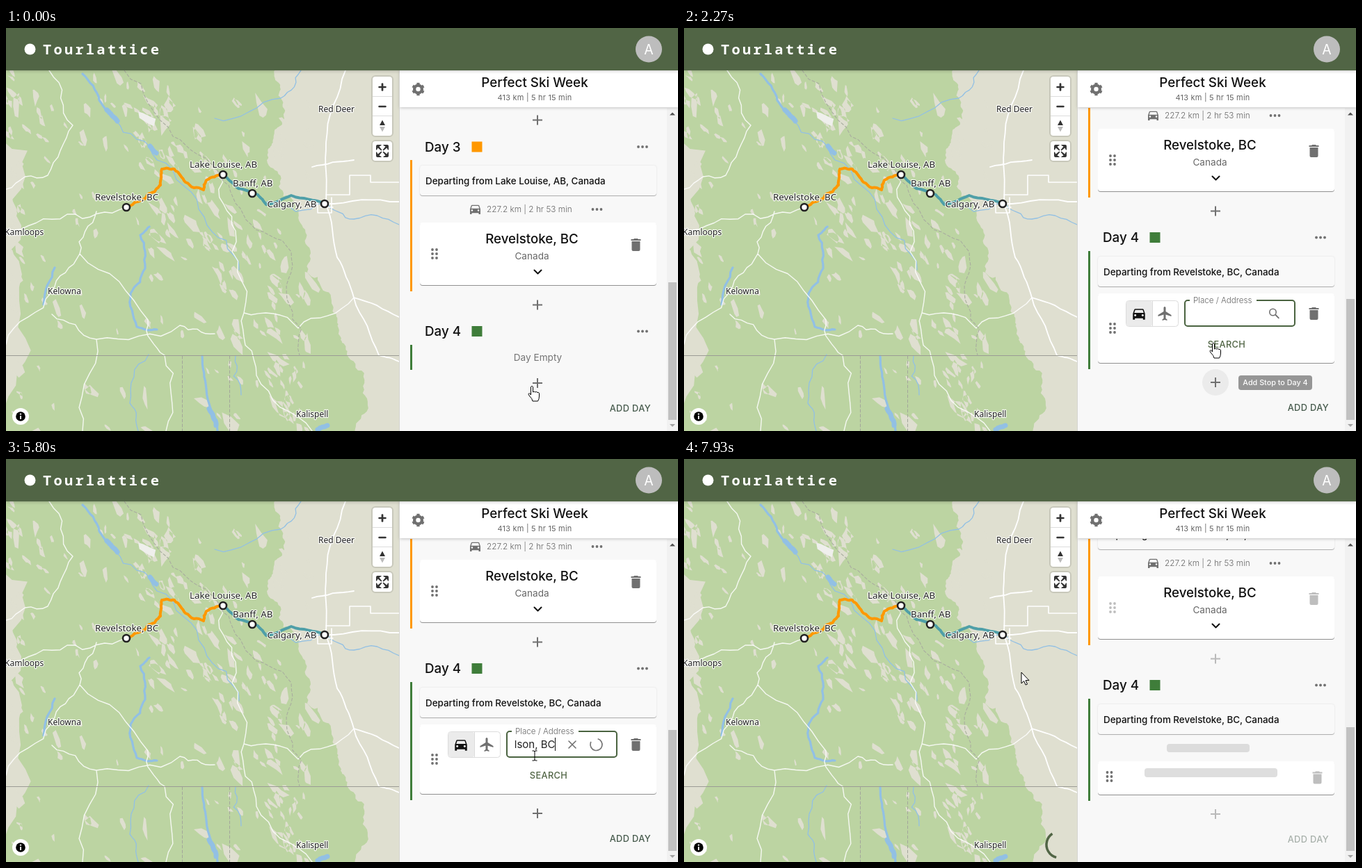
These frames come from a looping animation (966x580 px, 8000 ms). An HTML page:

```html
<!DOCTYPE html>
<html lang="en">
<head>
<meta charset="utf-8">
<title>Trip planner</title>
<style>
html,body{margin:0;width:100%;height:100%;overflow:hidden;background:#f8f8f8}
svg{display:block}
text{font-family:Inter,"Liberation Sans",sans-serif;white-space:pre}
.map text{font-family:"Noto Sans","Open Sans",sans-serif;fill:#222;paint-order:stroke;stroke:#fff;stroke-width:2.4px;stroke-linejoin:round;stroke-opacity:.85}
.brand{font-family:"Noto Sans Mono","DejaVu Sans Mono",monospace;font-weight:700;letter-spacing:3.23px}
.line{fill:none;stroke-linejoin:round;stroke-linecap:round}
.card{fill:#fff;filter:drop-shadow(0 1.3px .7px rgba(0,0,0,.42))}
.flat{fill:#f9f9f9;filter:drop-shadow(0 1px .6px rgba(0,0,0,.26)) drop-shadow(0 0 .8px rgba(0,0,0,.1))}
.ctrl{fill:#fff;stroke:rgba(0,0,0,.1);stroke-width:4;paint-order:stroke}
.bar{filter:drop-shadow(0 1px 2px rgba(0,0,0,.22))}
.soft{opacity:var(--soft,1)}
</style>
</head>
<body>
<script>
const LOOP = 8000;
const GREEN = '#516545', LEAF = '#3f7d3a', PINE = '#40603a', GREY = '#707070', INK = '#111';

// ---------- drawing helpers ----------
const text = (x, y, str, size, fill = INK, extra = '') =>
  `<text x="${x}" y="${y + size * .36}" font-size="${size}" fill="${fill}" ${extra}>${str}</text>`;
const mid = 'text-anchor="middle"', thin = 'font-weight="300"', firm = 'font-weight="500"';
const rect = (x, y, w, h, fill, extra = '') =>
  `<rect x="${x}" y="${y}" width="${w}" height="${h}" fill="${fill}" ${extra}/>`;
const box = (cls, x, y, w, h, extra = '') => rect(x, y, w, h, '', `class="${cls}" rx="4" ${extra}`);
const dot = (x, y, r, fill, extra = '') => `<circle cx="${x}" cy="${y}" r="${r}" fill="${fill}" ${extra}/>`;
const shape = (d, fill) => `<path d="${d}" fill="${fill}" fill-rule="evenodd"/>`;
const stroke = (d, color, width, extra = '') => `<path class="line" d="${d}" stroke="${color}" stroke-width="${width}" ${extra}/>`;
const ring = (id, r, color, width) => `<circle id="${id}" r="${r}" pathLength="127" fill="none" stroke="${color}" stroke-width="${width}"/>`;
const group = (id, body, extra = '') => `<g id="${id}" ${extra}>${body}</g>`;
const soft = body => `<g class="soft">${body}</g>`;
const place = (x, y, body, scale = 1) => `<g transform="translate(${x} ${y}) scale(${scale})">${body}</g>`;

// Icons are drawn around their own centre.
const add = (x, y) => rect(x - 7, y - 1, 14, 2, GREY) + rect(x - 1, y - 7, 2, 14, GREY);
const bin = (x, y) => place(x, y, shape('M-6-5H6V7Q6 9 4 9H-4Q-6 9-6 7ZM-7-6V-8H-3.500L-2.500-9H2.500L3.500-8H7V-6Z', GREY));
const car = (x, y, scale, fill = GREY) => place(x, y, shape('M-9 0L-7-6Q-6.500-7-5.500-7H5.500Q6.500-7 7-6L9 0V9H6V7H-6V9H-9ZM-7-1H7L5.500-5.500H-5.500Z', fill) +
  dot(-5.5, 2.5, 1.5, '#fff') + dot(5.5, 2.5, 1.5, '#fff'), scale);
const plane = (x, y) => place(x, y, shape('M9 4V2L1-3V-8.500Q.8-10-.5-10T-2-8.500V-3L-10 2V4L-2 1.500V7L-4 8.500V10L-.5 9L3 10V8.500L1 7V1.500Z', GREY));
const find = (x, y) => place(x, y, dot(-2, -2, 4.7, 'none', `stroke="${GREY}" stroke-width="1.600"`) + stroke('M2 2L6.300 6.300', GREY, 1.9));
const cross = (x, y) => stroke(`M${x - 5} ${y - 5}l10 10m0-10l-10 10`, GREY, 1.6);
const chevron = (x, y) => stroke(`M${x - 5} ${y - 2.5}l5 5l5-5`, INK, 2);
const gear = (x, y) => place(x, y, dot(0, 0, 5.4, 'none', `stroke="${GREY}" stroke-width="4.400"`) +
  dot(0, 0, 7.8, 'none', `stroke="${GREY}" stroke-width="2.800" pathLength="12" stroke-dasharray="1" transform="rotate(15)"`));
const more = (x, y) => [-6, 0, 6].map(d => dot(x + d, y, 1.9, GREY)).join('');
const grip = (x, y) => [-6, 0, 6].map(d => dot(x - 3, y + d, 1.9, GREY) + dot(x + 3, y + d, 1.9, GREY)).join('');
const addPin = y => place(905, y, shape('M0 9.500Q-6.700 2-6.700-3A6.700 6.700 0 0 1 6.700-3Q6.700 2 0 9.500Z', PINE) + dot(0, -3, 2.4, '#fff') +
  stroke('M7-11v8m-4-4h8', '#fff', 4) + stroke('M7-10v6m-3-3h6', PINE, 1.8));
const plus = y => soft(add(764, y));

// ---------- map ----------
let seed = 11;
const rnd = () => {
  seed = (seed + 0x6D2B79F5) | 0;
  let n = Math.imul(seed ^ seed >>> 15, 1 | seed);
  n = n + Math.imul(n ^ n >>> 7, 61 | n) ^ n;
  return ((n ^ n >>> 14) >>> 0) / 4294967296;
};
// Roughens a line given by a few key points: each pass pushes every midpoint sideways.
const wander = (str, rough = .16, passes = 3) => {
  let pts = str.split(' ').map(s => s.split(',').map(Number));
  while (passes--) pts = pts.flatMap((a, i) => {
    const b = pts[i + 1];
    if (!b) return [a];
    const k = (rnd() - .5) * 2 * rough;
    return [a, [(a[0] + b[0]) / 2 + (a[1] - b[1]) * k, (a[1] + b[1]) / 2 + (b[0] - a[0]) * k]];
  });
  return 'M' + pts.map(p => p.map(v => v.toFixed(1))).join('L');
};
const trails = (list, color, width, rough, extra) => stroke(list.map(s => wander(s, rough)).join(''), color, width, extra);

// An irregular angular patch, stretched along the mountain ranges.
const patch = (x, y, size, lean) => {
  let d = '';
  for (let i = 0; i < 7; i++) {
    const a = (i + rnd() * .8) / 7 * 6.283, r = size * (.45 + rnd() * .75);
    const u = Math.cos(a) * r * 1.5, v = Math.sin(a) * r * .55;
    d += (i ? 'L' : 'M') + (x + u * Math.cos(lean) - v * Math.sin(lean)).toFixed(1) + ' ' + (y + u * Math.sin(lean) + v * Math.cos(lean)).toFixed(1);
  }
  return d + 'Z';
};
// How open the land is: most along the ranges and near the west edge.
const openness = (x, y) => {
  const off = (x - 200 - (y - 100) * .62) / 62;
  return .13 + .62 * Math.exp(-off * off) * (y < 380 ? 1 : .55) + .5 * Math.exp(-x / 30) + .3 * (y > 500 && x > 300);
};
const clearings = () => {
  let d = '';
  for (let i = 0; i < 900; i++) {
    const x = rnd() * 440, y = 61 + rnd() * 519, p = openness(x, y);
    if (rnd() < p) d += patch(x, y, 3 + rnd() * rnd() * 12 + p * 3, 1.1 + (rnd() - .5));
  }
  return d;
};

const LAND = '#dfdfd0', WOOD = '#bcd4a2', WATER = '#92c0e4';
const stops = [['Revelstoke, BC', 128, 243, 173, 258], ['Lake Louise, AB', 264, 196, 312, 211], ['Banff, AB', 326, 223, 354, 238], ['Calgary, AB', 375.5, 253.5, 458, 253]];
const cities = [['Red Deer', 449, 117], ['Kamloops', -2, 294], ['Kelowna', 60, 379], ['Kalispell', 417, 555.5]];

const sign = (x, y) => stroke(`M${x - 4.4} ${y}h8.800`, '#333', 2.7);
const controls = box('ctrl', 527, 70, 28, 85) + box('ctrl', 527, 163, 28, 28) +
  rect(527, 98, 28, 1, '#ddd') + rect(527, 126, 28, 1, '#ddd') +
  sign(541, 85) + stroke('M541 80.600v8.800', '#333', 2.7) + sign(541, 113) +
  shape('M541 132.500l4 7.500h-8Z', '#333') + shape('M541 149.500l4-7.500h-8Z', '#bbb') +
  [0, 90, 180, 270].map(a => `<g transform="translate(541 177) rotate(${a})">${shape('M9 1.500V7Q9 9 7 9H1.500V8L4.500 6.500L.6 1.600L1.600.6L6.500 4.500L8 1.500Z', '#333')}</g>`).join('') +
  dot(21, 559, 12, '#fff') + dot(21, 559, 6.8, '#000') + rect(20, 558, 2, 5, '#fff') + dot(21, 555.6, 1.2, '#fff');

const map = `<svg class="map" x="0" y="61" width="565" height="519" viewBox="0 61 565 519">` +
  rect(0, 61, 565, 519, LAND) +
  shape(wander('-20,40 390,40 400,130 375,190 430,290 470,400 490,470 500,600 -20,600 -20,40', .22, 5) + 'Z', WOOD) +
  shape(clearings(), LAND) + shape(patch(200, 128, 14, .6), '#efefec') +
  trails(['157,132 217,190 285,272 335,348', '300,130 395,101 424,61', '375,250 458,252 500,275 565,283', '205,470 178,540 190,580', '330,472 338,528'], WATER, 1.3) +
  trails(['110,66 134,104 157,132', '206,286 193,298 200,346 179,382 188,430 217,434', '282,472 288,520 304,580', '70,345 54,398'], WATER, 3.2, .1) +
  trails(['145,118 160,134', '207,170 216,180', '292,548 302,572', '448,578 462,572'], WATER, 7, .1) +
  trails(['0,297 88,268 173,258', '130,264 106,325 66,380 0,455', '62,61 96,140 60,212 0,232', '106,325 204,420 228,471 230,580', '66,412 130,448 250,428 300,440',
    '312,211 330,292 342,410 420,432', '342,410 360,500 440,580', '420,432 500,388', '130,448 110,580'], '#fff', 1.4, .16, 'opacity=".85"') +
  trails(['488,61 460,165 460,250 476,330 500,388 565,416', '458,253 565,250', '440,200 500,190', '500,388 536,471 565,480'], '#fff', 1.8, .05) +
  stroke('M460 240H494V212H524V222H565M448 252V266H468V244M452 258H470', '#fff', 1.6) +
  stroke('M0 471.500H565', '#9b9b95', 1.1) +
  stroke('M253.500 472V580M321.500 472V580', '#a2a69a', 1, 'stroke-dasharray="4 3"') +
  trails(['170,61 240,156 308,212 345,276 410,322 408,400 422,471'], '#a9ad9f', 1.1, .14, 'stroke-dasharray="4 3"') +
  trails(['312,211 334,231 362,240 374,254 410,241 458,253'], '#4f9fa8', 4, .05) +
  trails(['173,258 197,247 213,236 222,226 224,203 242,203 258,222 284,233 288,219 312,211'], '#ff9800', 4, .12) +
  stops.map(s => text(s[1], s[2], s[0], 13.3)).join('') + cities.map(c => text(c[1], c[2], c[0], 12)).join('') +
  stops.map(s => dot(s[3], s[4], 5, '#fff', 'stroke="#222" stroke-width="2.600"')).join('') +
  controls + ring('mapSpin', 19, GREEN, 3.5) + '</svg>';

// ---------- itinerary panel ----------
const day = (n, y, color) => text(602, y, 'Day ' + n, 18.8, INK, firm) + rect(669.5, y - 7.5, 15, 15, color) + more(915, y);
const depart = (y, town) => box('flat', 595, y - 22, 340, 43) + text(603, y, `Departing from ${town}, Canada`, 13.4, INK, firm);
const footer = y => plus(y) + soft(text(927, y + 36.5, 'ADD DAY', 12.8, '#465a4c', `text-anchor="end" letter-spacing=".37" ${firm}`));
const bar = (y, h, color) => rect(581, y, 3, h, color);
const rule = y => rect(635, y, 290, 1, '#ddd');
const result = (y, name, ...lines) => text(643, y, name, 13.6, '#222') +
  lines.map((s, i) => text(643, y + 19 * (i + 1), s, 13.6, '#777', thin)).join('') + addPin(y + (lines.length > 1 ? 19 : 10));

const past = plus(132.5) + day(3, 171, '#ff9800') + bar(190, 189, '#ff9800') + depart(220, 'Lake Louise, AB') +
  car(674.5, 260.5, .83) + text(691, 261, '227.2 km | 2 hr 53 min', 11.8, '#666', thin) + more(849.5, 261) +
  box('card', 595, 280, 340, 90) + text(756, 303, 'Revelstoke, BC', 18.7, INK, `${mid} ${firm}`) + text(756, 328.5, 'Canada', 13.6, '#666', mid) +
  chevron(764.5, 351) + soft(grip(616, 325) + bin(905.5, 312)) + plus(398.5) + day(4, 436.5, LEAF);

const empty = bar(456, 36, LEAF) + text(764.5, 474, 'Day Empty', 13.6, '#757575', mid) + footer(511);

const form = bar(321, 170, LEAF) + depart(351, 'Revelstoke, BC') + box('card', 595, 382, 340, 100, 'id="formCard"') +
  group('formGrip', grip(616, 432)) + bin(905.5, 411) +
  rect(635.5, 392.5, 75, 37, '#fff', 'rx="4" stroke="#dcdcdc"') + rect(636, 393, 37, 36, '#ebebeb', 'rx="3"') + rect(673, 393, 1, 36, '#dcdcdc') +
  car(654, 411, .97, INK) + plane(691.5, 411) +
  rect(720, 392, 158, 37, '#fff', 'rx="4" stroke="#4a6340" stroke-width="2"') + rect(727, 390, 96, 5, '#fff', 'id="notch"') +
  text(732, 411, 'Place / Address', 15.5, '#666', 'id="label" font-weight="300"') +
  `<svg x="731" y="394" width="60" height="34" viewBox="731 394 60 34">${text(732.5, 411, '', 15, '#222', 'id="field"')}</svg>` +
  rect(732, 401, 1, 19, INK, 'id="caret"') + group('clear', cross(814, 411)) + group('find', find(848.5, 411)) + ring('fieldSpin', 8.5, '#777', 1.7) +
  group('hover', dot(764, 510, 19, '#ebebeb')) +
  group('search', text(780, 455, 'SEARCH', 12.8, GREEN, `${mid} ${firm} letter-spacing=".37"`) + footer(510)) +
  group('tip', rect(797, 500, 106, 21, '#757575', 'rx="4"') + text(850, 510.5, 'Add Stop to Day 4', 10.8, '#fff', `${mid} ${firm}`)) +
  group('results', rule(438) + result(454, 'Nelson, BC', 'Canada') + rule(489) +
    result(505, 'Tamber Main', '730 Tamber Street, Nelson, BC V0X', '0Y0, Canada') + rule(558) + result(575, 'Tamber Fuels'));

const pending = bar(345, 147, LEAF) + depart(375, 'Revelstoke, BC') + rect(694, 410, 119, 12, '#dcdcdc', 'rx="4"') +
  box('card', 595, 435, 340, 48) + rect(662, 445, 191, 13, '#dedede', 'rx="4"') +
  grip(611.5, 457) + soft(bin(910.5, 458.5)) + footer(511);

const panel = rect(566, 61, 400, 519, '#f8f8f8') +
  '<svg x="566" y="115" width="384" height="465" viewBox="566 115 384 465">' +
  group('scroll', past + group('empty', empty) + group('form', form, 'transform="translate(0 135)"') + group('pending', pending, 'transform="translate(0 111)"')) + '</svg>' +
  rect(950, 115, 16, 465, '#f1f1f1') + rect(952, 366, 12, 197, '#c1c1c1', 'id="thumb"') +
  shape('M954 125.500l4-4l4 4Z', '#505050') + group('arrow', '<path d="M954 570l4 4l4-4Z"/>') +
  rect(566, 61, 400, 53, '#fff', 'class="bar"') + gear(592.5, 88) + text(760, 78, 'Perfect Ski Week', 18.8, INK, `${mid} ${firm}`) +
  text(760, 100.5, '413 km | 5 hr 15 min', 11, '#666', mid + ' letter-spacing=".2"') + rect(565, 61, 1, 519, '#d4d4d0');

const header = rect(0, 0, 966, 61, GREEN, 'class="bar"') + dot(34.5, 30.5, 8, '#fff') +
  text(53, 30.7, 'Tourlattice', 20.4, '#fff', 'class="brand"') + dot(924, 30.5, 19, '#bdbdbd') + text(924, 31, 'A', 19.4, '#fff', mid);

const pointers = '<g id="pointer" stroke="#000" stroke-linejoin="round" fill="#fff">' +
  '<path id="hand" d="M-1.500 1.500q1.500-2.500 3 0V9q1.800-1.500 3.300 0q1.800-1.200 3.200.6q2-.8 2.500 1.200V15q0 4-2 7H1q0-3-5-8q-2-3 .5-3.300L-1.500 13Z"/>' +
  '<path id="plain" d="M0 0V16l3.700-3.500 2.400 5.600 2.400-1-2.400-5.500H11z"/>' +
  '<path id="beam" fill="none" d="M-3.500-7h2.500l1 1 1-1h2.500M0-6V6M-3.500 7h2.500l1-1 1 1h2.500"/></g>';

document.body.innerHTML = `<svg width="966" height="580" viewBox="0 0 966 580">${map}${panel}${header}${pointers}</svg>`;

// ---------- motion ----------
const $ = id => document.getElementById(id);
const ramp = (t, a, b) => Math.max(0, Math.min(1, (t - a) / (b - a)));
const smooth = p => p * p * (3 - 2 * p);
const show = (id, on) => { $(id).style.display = on ? '' : 'none'; };
const set = (id, attrs) => { for (const k in attrs) $(id).setAttribute(k, attrs[k]); };

const OPEN = 1390, FOUND = 5870, CHOSEN = 7330;
const WORD = 'Nelson, BC', KEYS = [3270, 3400, 3530, 3670, 3730, 3800, 4070, 4270, 4470, 4670];
const MOVES = [[270, 330, 758, 515], [2130, 2270, 761, 453], [2400, 2600, 760, 427], [6400, 6600, 790, 424], [6650, 7000, 906, 464], [CHOSEN, 7900, 485, 307]];

function pointer(t, open) {
  let x = 756, y = 515;
  for (const [from, to, nx, ny] of MOVES) {
    const p = smooth(ramp(t, from, to));
    x += (nx - x) * p;
    y += (ny - y) * p;
  }
  const inField = open && x < 825 && y > 392 && y < 431;
  const onButton = t < OPEN || open && t > 1900 && (x > 895 || Math.abs(y - 510) < 19 || Math.abs(y - 455) < 10);
  set('pointer', { transform: `translate(${x} ${y})` });
  show('beam', inField);
  show('hand', onButton);
  show('plain', !inField && !onButton);
}

// Indeterminate ring: the arc grows, then its tail catches up while it turns.
function spin(id, x, y, age, on) {
  show(id, on);
  const p = (age % 1400) / 1400, grow = smooth(ramp(p, 0, .5)), chase = smooth(ramp(p, .5, 1));
  const start = 15 * grow + 110 * chase, len = Math.min(1 + 99 * grow, 127 - start);
  set(id, { 'stroke-dasharray': `${Math.max(.5, len)} 200`, transform: `translate(${x} ${y}) rotate(${p * 360 + start / 127 * 360})` });
}

function typing(t, open) {
  const count = KEYS.filter(k => t >= k).length, field = $('field');
  field.textContent = WORD.slice(0, count);
  const width = open && count ? field.getComputedTextLength() : 0;
  set('field', { x: 732.5 - Math.max(0, width - 57) });
  set('caret', { x: Math.round(732 + Math.min(57, width)) });
  const idle = t - (count ? KEYS[count - 1] : 1400);
  show('caret', idle < 0 || idle % 1060 < 530);
  show('clear', count > 0);

  const up = .28 + .72 * ramp(t, 1400, 1540), size = 15.5 - 3.9 * up;
  set('label', { 'font-size': size, y: 411 - 19 * up + size * .36 });
  show('notch', up > .7);
}

function render(t) {
  const open = t >= OPEN && t < CHOSEN, found = open && t >= FOUND, done = t >= CHOSEN, busy = open && t >= 4970 && !found;
  show('empty', t < OPEN);
  show('form', open);
  show('pending', done);
  show('search', !found);
  show('results', found);
  set('formCard', { height: found ? 256 : 100 });
  set('formGrip', { transform: `translate(0 ${found ? 78 : 0})` });

  const s = smooth(ramp(t, 1410, 1900));
  set('scroll', { transform: `translate(0 ${done ? -111 : -Math.round(135 * s)})` });
  const [y, height] = done ? [386, 178] : found ? [359, 153] : open ? [339 + 51 * s, 174] : [366, 198];
  set('thumb', { y, height });
  set('arrow', { fill: y + height > 562 ? '#a3a3a3' : '#505050' });

  const dim = done ? ramp(t, CHOSEN, 7480) : ramp(t, 800, 930) - ramp(t, 1070, 1200);
  document.body.style.setProperty('--soft', 1 - .55 * dim);
  $('tip').style.opacity = ramp(t, 1930, 2080) - ramp(t, 2220, 2420);
  $('hover').style.opacity = ramp(t, 1900, 2030) - ramp(t, 2270, 2400);

  show('find', !busy);
  spin('fieldSpin', 848.5, 411, Math.max(0, t - 4970), busy);
  spin('mapSpin', 540, 555, Math.max(0, t - 7600), t >= 7600);
  typing(t, open);
  pointer(t, open);
}

const t0 = performance.now();
(function tick() {
  render((performance.now() - t0) % LOOP);
  requestAnimationFrame(tick);
})();
</script>
</body>
</html>
```
